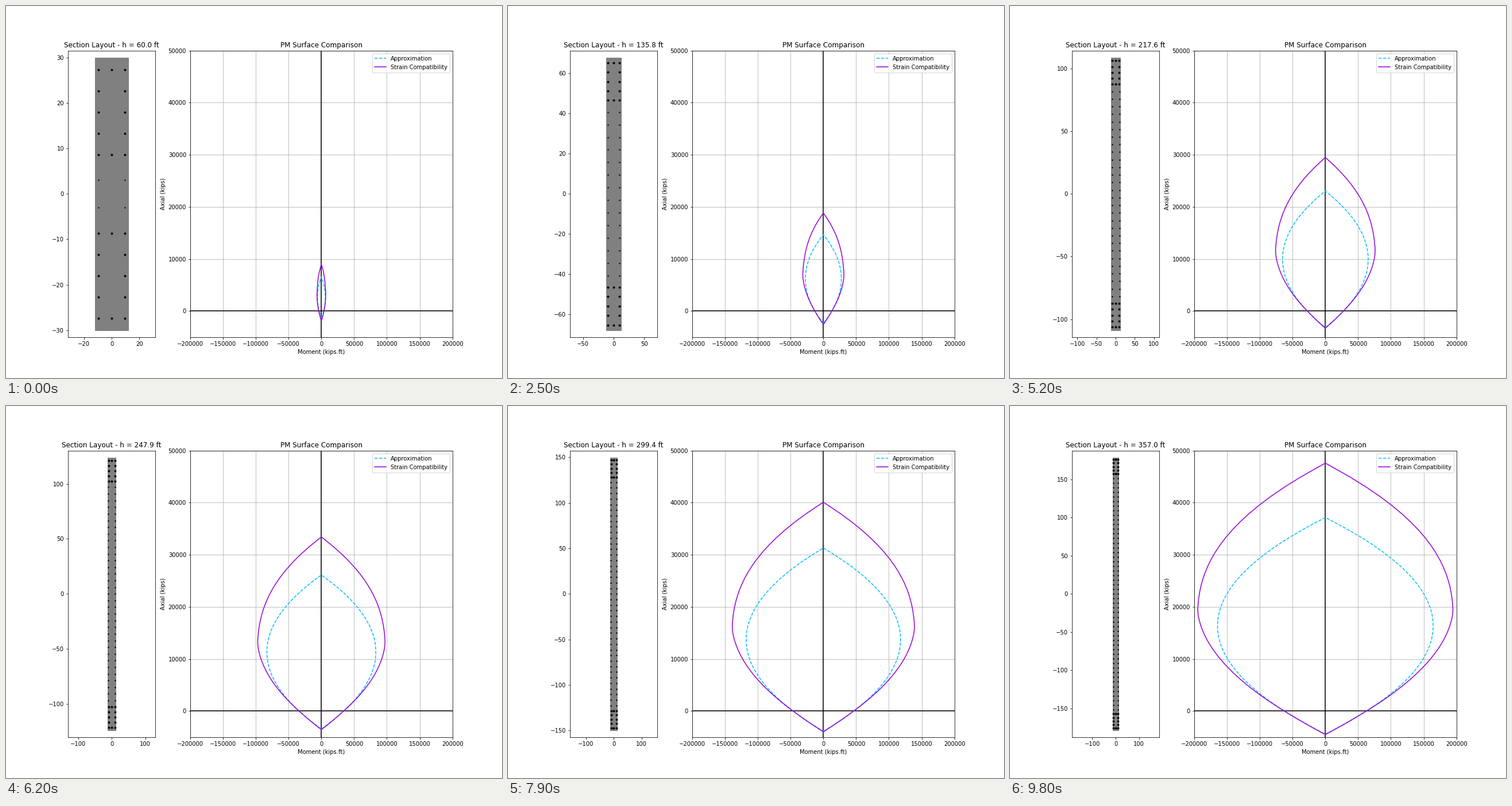
Animation of 864x648 px, one loop 9900 ms. Source, as a matplotlib script:

```python
import numpy as np
import matplotlib.pyplot as plt
from matplotlib.animation import FuncAnimation
from matplotlib.patches import Rectangle

STEPS = 99
WIDTH = 24.0            # wall thickness
END = 24.0              # length of each end zone
COVER = 2.0
FC, FY, ES, ECU = 6.0, 60.0, 29000.0, 0.003
BETA = 0.75
BIG_AREA, BIG_DIA = 1.27, 1.27
SMALL_AREA, SMALL_DIA = 0.44, 0.75
BIG_MARK, SMALL_MARK = 8.5, 2.0


def end_bars(h):
    """Twelve large bars around the rim of each end zone."""
    edge = COVER + BIG_DIA / 2
    x = WIDTH / 2 - edge
    rows = np.linspace(h / 2 - edge, h / 2 - END + edge, 5)
    top = [(s * x, y) for y in rows for s in (-1, 1)]
    top += [(0, rows[0]), (0, rows[-1])]
    return np.array(top + [(px, -py) for px, py in top])


def web_bars(h):
    """Pairs of small bars, one pair in the middle of each equal cell."""
    x = WIDTH / 2 - COVER - SMALL_DIA / 2
    length = h - 2 * END
    n = int(length // 6)
    ys = (np.arange(n) + 0.5) * length / n - length / 2
    return np.array([(s * x, y) for y in ys for s in (-1, 1)])


def mirror(m, p):
    """Close a half curve into a symmetric loop."""
    return np.r_[m, -m[::-1]], np.r_[p, p[::-1]]


def strain_curve(h, y, area):
    c = h * np.geomspace(1e-4, 1 / BETA, 220)[:, None]
    d = h / 2 - y
    a = BETA * c
    stress = np.clip(ES * ECU * (c - d) / c, -FY, FY)
    force = (stress - 0.85 * FC * (d < a)) * area
    block = 0.85 * FC * WIDTH * a[:, 0]
    p = block + force.sum(axis=1)
    m = (block * (h - a[:, 0]) / 2 + force @ y) / 12
    steel = area.sum()
    peak = 0.85 * FC * (WIDTH * h - steel) + 57 * steel
    return mirror(np.r_[0, m, 0], np.r_[-FY * steel, p, peak])


def approx_curve(h, steel):
    pull = FY * steel
    low = -pull + 33000 / h
    high = pull + 0.85 * BETA * FC * WIDTH * h - 52000 / h
    p = np.linspace(low, high, 100)
    return mirror(3.808e-4 * (p - low) * (high - p), p)


fig, (sec, pm) = plt.subplots(
    1, 2, figsize=(12, 9), dpi=72, gridspec_kw={"width_ratios": [1, 3]})

wall = sec.add_patch(Rectangle((0, 0), 1, 1, color="gray"))
big = sec.scatter([], [], s=BIG_MARK, color="black", zorder=3)
small = sec.scatter([], [], s=SMALL_MARK, color="black", zorder=3)

pm.set_title("PM Surface Comparison")
pm.set_xlabel("Moment (kips.ft)")
pm.set_ylabel("Axial (kips)")
pm.set_xlim(-200000, 200000)
pm.set_ylim(-5000, 50000)
pm.grid(True)
pm.axhline(0, color="black")
pm.axvline(0, color="black")
approx, = pm.plot([], [], "--", color="deepskyblue", label="Approximation")
strain, = pm.plot([], [], color="darkviolet", label="Strain Compatibility")
pm.legend(loc="upper right")


def update(i):
    h = 60 + 300 * i / STEPS
    ends, web = end_bars(h), web_bars(h)
    big.set_offsets(ends)
    small.set_offsets(web)
    wall.set_bounds(-WIDTH / 2, -h / 2, WIDTH, h)
    lim = 1.05 * h / 2
    sec.set_xlim(-lim, lim)
    sec.set_ylim(-lim, lim)
    sec.set_title(f"Section Layout - h = {h:.1f} ft")

    y = np.r_[ends[:, 1], web[:, 1]]
    area = np.r_[np.full(len(ends), BIG_AREA), np.full(len(web), SMALL_AREA)]
    approx.set_data(*approx_curve(h, area.sum()))
    strain.set_data(*strain_curve(h, y, area))
    return wall, big, small, approx, strain


anim = FuncAnimation(fig, update, frames=STEPS, interval=100,
                     repeat=True, repeat_delay=0)
plt.show()
```
